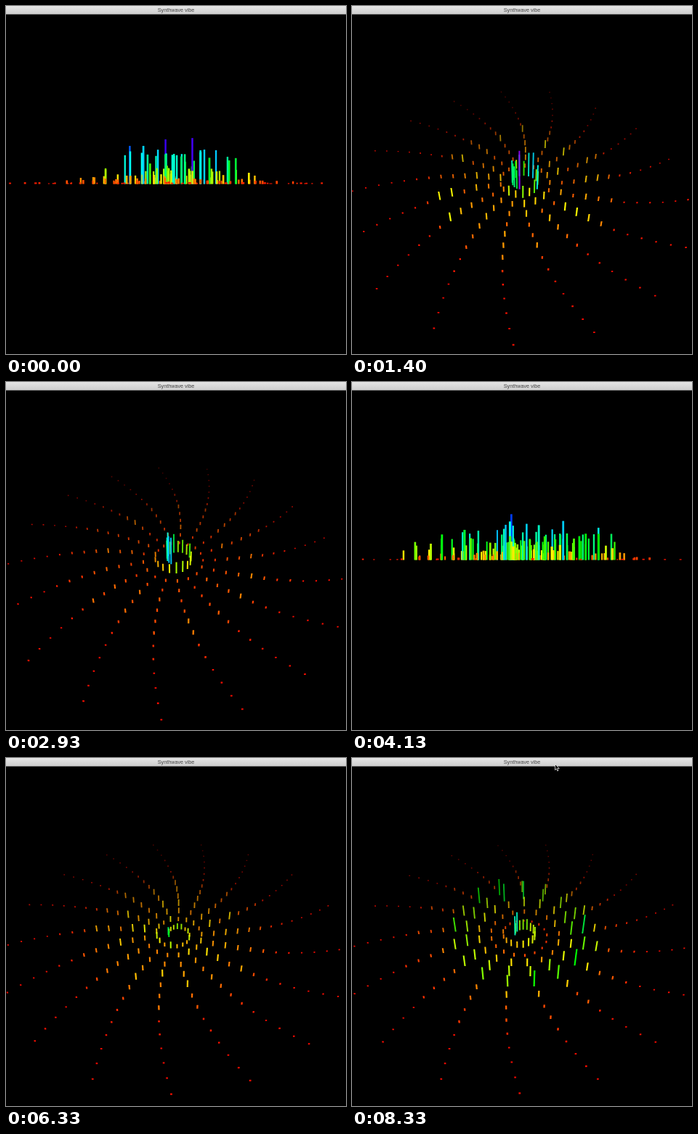
These frames come from a looping animation (468 by 480 pixels, 8390 ms). An HTML page with a canvas:

```html
<!DOCTYPE html>
<html>
<head>
<meta charset="utf-8">
<title>Synthwave vibe</title>
<style>
  html, body { margin: 0; width: 468px; height: 480px; overflow: hidden; background: #000; }
  canvas { position: absolute; left: 0; top: 0; }
  header {
    position: absolute; left: 0; top: 0; width: 468px; height: 11px;
    background: linear-gradient(#e6e6e6, #cecece); border-bottom: 1px solid #666;
    font: 7.2px/12px "Liberation Sans", Arial, sans-serif;
    color: #444; text-align: center;
  }
  svg { position: absolute; left: 279px; display: none; }
</style>
</head>
<body>
<canvas id="stage" width="468" height="480"></canvas>
<header>Synthwave vibe</header>
<svg id="cursor" width="8" height="11" viewBox="0 0 8 11">
  <path d="M.5 .5V8.5L2.4 6.8 3.7 9.9 5 9.3 3.7 6.4H6.3Z" fill="#000" stroke="#fff" stroke-width=".7"/>
</svg>
<script>
const LOOP = 8390, FRAMES = 126;
const COUNT = 240, PER_TURN = 17, FIRST = 10;
const FOCAL = 565, CX = 234, CY = 245.5;
const STEP = 358.65 / PER_TURN, GAP = .0294;
const ctx = document.getElementById('stage').getContext('2d');
const cursor = document.getElementById('cursor');

// Level (as a hue) over the turns of the spiral, from the middle outwards.
const KNOTS = [0, .8, 1.8, 3.5, 5.2, 6.6, 8.3, 10.5];
const SPECTRA = [
  { at: 0,   core: 1,  spread: 1,  levels: [130, 130, 130, 105, 85, 45, 10, 4] },
  { at: 21,  core: 1,  spread: .5, levels: [250, 200, 40, 35, 38, 42, 8, 3] },
  { at: 44,  core: 1,  spread: .5, levels: [250, 150, 18, 20, 26, 28, 12, 3] },
  { at: 62,  core: 1,  spread: 1,  levels: [130, 110, 110, 115, 120, 120, 80, 4] },
  { at: 84,  core: .25, spread: .4, levels: [250, 90, 10, 8, 8, 7, 6, 3] },
  { at: 106, core: .2, spread: .4, levels: [200, 60, 75, 85, 72, 58, 15, 3] },
  { at: 125, core: .8, spread: .4, levels: [210, 110, 8, 50, 130, 28, 18, 3] }
];

const mix = (a, b, u) => a + (b - a) * u;
const clamp = (v, lo, hi) => Math.min(hi, Math.max(lo, v));

function random(a, b) {
  const s = Math.sin(a * 127.1 + b * 311.7) * 43758.5453;
  return s - Math.floor(s);
}

function noise(i, t) {
  const n = Math.floor(t);
  return mix(random(i, n), random(i, n + 1), t - n);
}

function along(points, x) {
  let n = 0;
  while (n < points.length - 2 && x >= points[n + 1]) n++;
  return [n, clamp((x - points[n]) / (points[n + 1] - points[n]), 0, 1)];
}

function spectrumAt(frame) {
  const [n, u] = along(SPECTRA.map(s => s.at), frame);
  const a = SPECTRA[n], b = SPECTRA[n + 1];
  return {
    core: mix(a.core, b.core, u),
    spread: mix(a.spread, b.spread, u),
    levels: a.levels.map((v, j) => mix(v, b.levels[j], u))
  };
}

// Degrees, settling from a quick turn to a steady one.
const spin = s => -9.5 * s + 31.2 * Math.exp(-s / 2.64) - 7.25;

function draw(frame) {
  const seconds = frame * LOOP / FRAMES / 1000;
  const level = frame < 7 || (frame >= 54 && frame < 76);
  const tilt = level ? 0 : Math.PI / 4;
  const sin = Math.sin(tilt), cos = Math.cos(tilt);
  const { core, spread, levels } = spectrumAt(frame);
  const turn = spin(seconds);

  const project = (x, h, z) => {
    const scale = FOCAL / (1 - z * cos - h * sin);
    return [CX + x * scale, CY + (z * sin - h * cos) * scale, scale / FOCAL];
  };

  const bars = [];
  for (let i = FIRST; i <= COUNT; i++) {
    const k = i / PER_TURN;
    const r = GAP * k;
    const angle = (turn - (i - 231) * STEP) * Math.PI / 180;
    const [n, u] = along(KNOTS, k);
    const base = mix(levels[n], levels[n + 1], u);
    const hue = Math.min(360, base * (1 + spread * (2 * noise(i, frame / 3) ** 2 - .8)));
    const height = hue / 4.1 / FOCAL * mix(core, 1, Math.min(1, k / 3));
    bars.push({ x: r * Math.sin(angle), z: r * Math.cos(angle), hue, height });
  }
  bars.sort((a, b) => a.z - b.z);

  ctx.fillStyle = '#000';
  ctx.fillRect(0, 0, 468, 480);
  for (const { x, z, hue, height } of bars) {
    if (level && hue < 4.1) continue;
    const [x0, y0, near] = project(x, 0, z);
    const [x1, y1] = project(x, height, z);
    const half = (level ? 1.2 : 1) * near;
    const foot = level ? 0 : .6 * near;
    ctx.globalAlpha = level ? 1 : clamp(.9 + 1.6 * z, .25, 1);
    ctx.fillStyle = `hsl(${hue}, 100%, 50%)`;
    ctx.beginPath();
    ctx.moveTo(x0 - half, y0 + foot);
    ctx.lineTo(x0 + half, y0 + foot);
    ctx.lineTo(x1 + half, y1 - foot);
    ctx.lineTo(x1 - half, y1 - foot);
    ctx.fill();
  }
  ctx.globalAlpha = 1;

  cursor.style.display = frame > 120 ? 'block' : 'none';
  cursor.style.top = Math.min(8, 2 + (frame - 121) * 2) + 'px';
}

function tick() {
  const t = performance.now() % LOOP;
  draw(Math.min(FRAMES - 1, Math.floor(t * FRAMES / LOOP + .1)));
  requestAnimationFrame(tick);
}
tick();
</script>
</body>
</html>
```
